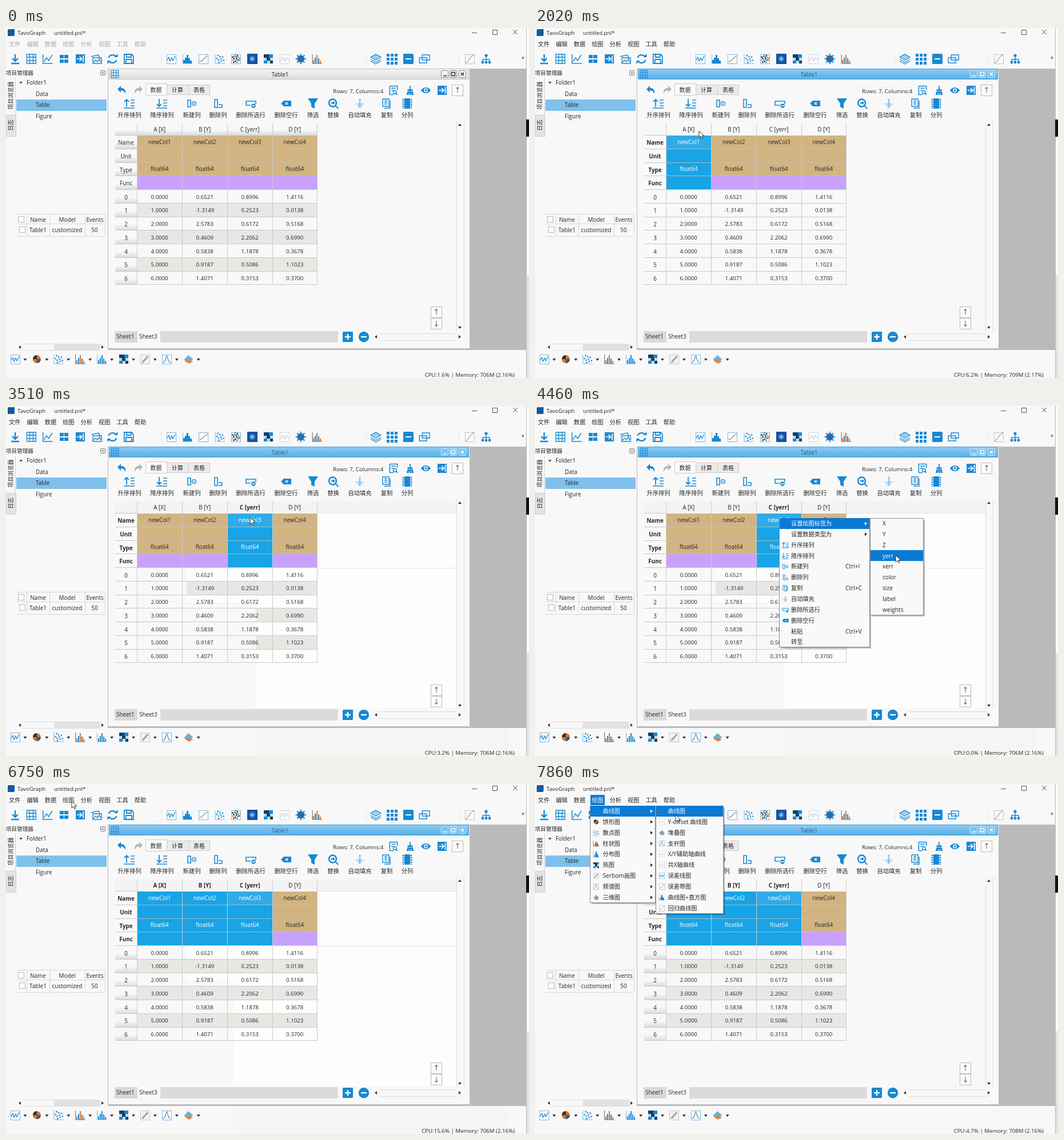
These frames come from a looping animation (915x612 px, 8000 ms). An HTML page:

```html
<!DOCTYPE html>
<html lang="zh">
<head>
<meta charset="utf-8">
<title>Table editor</title>
<style>
  html, body { margin: 0; width: 100%; height: 100%; overflow: hidden; background: #f8f8f8; }
  svg { display: block; }
  text { font-family: "Open Sans", "Noto Sans CJK SC", "Noto Sans CJK", sans-serif; white-space: pre; }
  rect { shape-rendering: crispEdges; }
</style>
</head>
<body>
<svg width="915" height="612" viewBox="0 0 915 612">
  <defs>
    <linearGradient id="head" x2="0" y2="1"><stop offset=".55" stop-color="#f8f8f8"/><stop offset="1" stop-color="#dadada"/></linearGradient>
    <linearGradient id="idle" x2="0" y2="1"><stop stop-color="#f4f4f4"/><stop offset="1" stop-color="#dedede"/></linearGradient>
    <linearGradient id="live" x2="0" y2="1"><stop stop-color="#8ccbf3"/><stop offset="1" stop-color="#59b0e6"/></linearGradient>
  </defs>
  <g id="base"></g>
  <g id="scene"></g>
</svg>
<script>
const BLUE = '#1788d4', INK = '#262626', HOT = '#0a7ad4', PICK = '#18a4e6', CURRENT = '#2fabe8';
const LOOP = 8000;

const rect = (x, y, w, h, fill = 'none', stroke = 'none', r = 0) =>
  `<rect x="${x}" y="${y}" width="${w}" height="${h}" fill="${fill}" stroke="${stroke}" rx="${r}"/>`;
const path = (d, stroke = BLUE, width = 1, fill = 'none', dash = 'none') =>
  `<path d="${d}" stroke="${stroke}" stroke-width="${width}" fill="${fill}" stroke-dasharray="${dash}"/>`;
const shape = (d, fill = BLUE) => path(d, 'none', 0, fill);
const dashed = (d, stroke, dash, width = 1) => path(d, stroke, width, 'none', dash);
const dot = (x, y, r, fill = BLUE) => `<circle cx="${x}" cy="${y}" r="${r}" fill="${fill}"/>`;
const ring = (x, y, r, width) => `<circle cx="${x}" cy="${y}" r="${r}" fill="none" stroke="${BLUE}" stroke-width="${width}"/>`;
const text = (x, y, str, { size = 9.9, fill = INK, anchor = 'start', bold = false } = {}) =>
  `<text x="${x}" y="${y + 3.6}" font-size="${size}" fill="${fill}" text-anchor="${anchor}" font-weight="${bold ? 700 : 400}">${str}</text>`;
const mid = (x, y, str, opts) => text(x, y, str, { anchor: 'middle', ...opts });
const times = (n, fn) => Array.from({ length: n }, (_, i) => fn(i)).join('');

// Icons live in a box from -9 to 9.
const frame = rect(-8, -8, 16, 16, '#fdfdfd', '#7bb8e3');
const bars = colors => [6, 10, 15, 9, 5].map((h, i) => rect(-7 + i * 3, 8 - h, 2.2, h, colors[i % colors.length])).join('');
const cloud = (n, colors) => times(n, i => {
  const r = 7.5 * Math.sqrt((i + .5) / n);
  return dot(r * Math.cos(i * 2.4), r * Math.sin(i * 2.4), 1.3, colors[i % colors.length]);
});
const arrows = tip => path('M2-6H9M2-1H9M2 4H9M-10 8H9', BLUE, 1.7) + path(tip, BLUE, 1.8);
const column = path('M-7-6H-2V6H-7Z', BLUE, 1.6);
const icons = {
  down: path('M0-8V4M-5-1L0 4 5-1M-7 8H7', BLUE, 2.4),
  grid: path('M-8-8H8V8H-8ZM-8-3H8M-8 3H8M-3-8V8M3-8V8', BLUE, 1.3),
  plot: path('M-8-8V8H9M-6 5L-2-2 2 3 8-7', BLUE, 1.5),
  tiles: times(4, i => rect(-7 + i % 2 * 8, -7 + (i >> 1) * 8, 6.3, 6.3, BLUE)),
  into: rect(-8, -8, 16, 16, BLUE) + path('M-6 0H3M-1-4L3 0-1 4M5.5-6V6', '#fff', 1.7),
  album: path('M-9-4L4-7 6 0M-6-2H9V8H-6ZM-5 6L-1 2 2 5 5 1 8 5', BLUE, 1.4),
  sync: path('M-7-2A7.5 7.5 0 0 1 6-4M7 2A7.5 7.5 0 0 1-6 4', BLUE, 2.2) + shape('M3-3H9V-9ZM-3 3H-9V9Z'),
  save: path('M-8-8H5L8-5V8H-8ZM-4-8V-3H4V-8M-5 8V1H5V8', BLUE, 1.8),
  wave: frame + path('M-7 2L-4-3-2 4 1-2 3 3 7-5', BLUE, 1.3),
  bars: path('M-8-8V8H9', '#7bb8e3') + bars([BLUE]),
  trend: frame + path('M-7 5C0 4 0-3 7-5', '#8a8f70', 1.2),
  scatter: path('M-8-8V8H9', '#7bb8e3') + cloud(9, [BLUE]),
  mixed: frame + cloud(16, ['#222', '#d87b2a', '#222', BLUE]),
  heat: rect(-9, -9, 18, 18, '#1b4f9c') + dot(0, 0, 5, '#2e8bd8') + dot(0, 0, 2.2, '#8fd3ee'),
  blocks: rect(-8, -8, 16, 16, '#b9dcec') + rect(-8, -8, 9, 6, '#123e66') + rect(1, -8, 7, 6, BLUE)
    + rect(-3, -2, 6, 5, '#123e66') + rect(-8, 3, 6, 5, BLUE) + rect(3, 3, 5, 5, '#123e66'),
  pale: rect(-8, -8, 16, 16, '#fdfdfd', '#c9d8e4') + path('M-7 3L-3-3 0 4 3-3 7 3', '#b5b9d8'),
  blob: dot(0, 0, 6.5, '#2c6da8') + times(8, i => dot(8 * Math.cos(i * .785), 8 * Math.sin(i * .785), 1.3)),
  hist: path('M-8-8V8H9', '#666') + bars(['#d8752d', BLUE]),
  layers: shape('M0-9L9-4 0 1-9-4Z', '#9fd0f0') + path('M0-8L9-3 0 2-9-3ZM-9 1L0 6 9 1M-9 4L0 9 9 4', BLUE, 1.2),
  nine: times(9, i => rect(-9 + i % 3 * 7, -9 + (i / 3 | 0) * 7, 4.6, 4.6, BLUE)),
  minus: rect(-9, -9, 18, 18, BLUE, 'none', 2) + rect(-5, -1.2, 10, 2.4, '#fff'),
  windows: path('M-4-7H9V2H-4ZM-9-2H4V7H-9Z', BLUE, 1.4),
  curve: rect(-8, -8, 16, 16, 'none', '#c4c4c4') + path('M-7 7C-1 5-2-1 8-8', '#777'),
  tree: path('M0-5V1M-6 5V1H6V5M0 1V5', BLUE, 1.3) + dot(0, -6, 2.6) + dot(-6, 6, 2.4) + dot(0, 6, 2.4) + dot(6, 6, 2.4),
  pie: dot(0, 0, 7, '#d97428') + shape('M0 0V-7A7 7 0 0 0-7 0Z', '#333') + shape('M0 0H7A7 7 0 0 1 0 7Z', '#235d91'),
  brushed: rect(-8, -8, 16, 16, '#f2f2f2', '#c9c9c9') + path('M-5 6L5-5', '#b79b85', 3),
  peak: frame + path('M-7 6C-1 6-2-6 0-6S1 6 7 6', '#477ca8', 1.2),
  solid: shape('M-8 1L0-7 8 0 1 6Z', '#62b4dc') + shape('M-7 3L1 1 8 4 1 8Z', '#d98848'),
  undo: shape('M-8-1L-2-7V-3C5-3 7 2 6 7 4 3 2 1-2 1V5Z'),
  redo: shape('M8-1L2-7V-3C-5-3-7 2-6 7-4 3-2 1 2 1V5Z', '#b5b5b5'),
  find: path('M-7-8H7V-1M-7-8V8H0M-4-4H4M-4 0H0', BLUE, 1.6) + path('M7 8L4 5', BLUE, 2) + ring(2.5, 3.5, 3, 1.5),
  broom: shape('M-1-9H1V-2H5V1H-5V-2H-1ZM-5 2H5L7 9H-7Z') + path('M-2 5V9M2 5V9', '#fff'),
  eye: shape('M-9 0C-4-7 4-7 9 0 4 7-4 7-9 0Z') + dot(0, 0, 3.6, '#fff') + dot(0, 0, 2),
  asc: arrows('M-5 6V-7M-9-3L-5-7-1-3'),
  desc: arrows('M-5-8V5M-9 1L-5 5-1 1'),
  addcol: column + ring(4, 0, 3.4, 1.4) + path('M5 0H3M4-1V1', BLUE, 1.2),
  delcol: path('M-6-7H-1V7H-6Z', BLUE, 1.6) + path('M1 7H7V2H1', BLUE, 1.5),
  delrow: path('M0 3H-8V-4H9V1', BLUE, 1.6) + dot(5, 4, 3.7) + rect(3, 3.4, 4, 1.2, '#fff'),
  empty: shape('M-9 0L-4-5H9V5H-4Z') + path('M-1-2L3 2M3-2L-1 2', '#fff', 1.4),
  filter: shape('M-9-9H9L3 0V9L-3 6V0Z'),
  swap: ring(-1, -1, 6.5, 2.4) + path('M4 4L9 9M-4-1H2M0-3L2-1 0 1', BLUE, 2),
  fill: dashed('M0-8V6', '#6cb5e4', '2 1', 3) + dashed('M-7 1H7M-4 4H4M-2 7H2', '#6cb5e4', '2 1', 1.6),
  copy: path('M-7-8H4V5H-7ZM6-5V8H-4M-4-5H1M-4-2H1M-4 1H1', BLUE, 1.4),
  split: rect(-5, -9, 10, 18, BLUE) + dashed('M-7-8V9M7-8V9', BLUE, '2.4 1.6', 2.6)
};
const icon = (name, x, y, scale = 1) => `<g transform="translate(${x} ${y}) scale(${scale})">${icons[name]}</g>`;
const iconRow = (names, x, y, gap) => names.split(' ').map((n, i) => icon(n, x + i * gap, y)).join('');
const tri = (x, y, dir, fill = '#333') =>
  shape({ l: `M${x + 2} ${y - 3}v6l-4-3z`, r: `M${x - 2} ${y - 3}v6l4-3z`, u: `M${x - 3} ${y + 2}h6l-3-4z`, d: `M${x - 3} ${y - 2}h6l-3 4z` }[dir], fill);
const arrowBox = (x, y, s) => rect(x + .5, y + .5, 19, 19, '#fbfbfb', '#bbb') + mid(x + 10, y + 10, s, { size: 11 });

function baseLayer() {
  const tools = [['asc', 216, '升序排列'], ['desc', 273, '降序排列'], ['addcol', 325, '新建列'], ['delcol', 371, '删除列'],
    ['delrow', 428, '删除所选行'], ['empty', 490, '删除空行'], ['filter', 537, '筛选'], ['swap', 572.5, '替换'],
    ['fill', 619, '自动填充'], ['copy', 666, '复制'], ['split', 702, '分列']];
  return rect(0, 0, 915, 612, '#f8f8f8')
    + rect(3, 2, 12, 12, '#155a9c', 'none', 2)
    + text(20, 8, 'TavoGraph', { size: 9.8 }) + text(84, 8, 'untitled.pnl*', { size: 9.4 })
    + path('M815 8.500H824M851.500 3.500H859.500V11.500H851.500ZM887 3L895 11M895 3L887 11', '#555')
    + iconRow('down grid plot tiles into album sync save', 16, 54, 28.4)
    + iconRow('wave bars trend scatter mixed heat blocks pale blob hist', 289, 54, 28.35)
    + iconRow('layers nine minus windows', 647, 54, 28.4) + icon('curve', 811, 54) + icon('tree', 840, 54)
    + [272, 630, 793].map(x => dashed(`M${x} 46V64`, '#c8c8c8', '1.5 2')).join('')
    + text(902, 51, '»')
    // project panel
    + text(0, 78, '项目管理器', { size: 9.6 })
    + rect(165.5, 74.5, 8, 8, 'none', '#777', 2) + path('M167.500 76.500L171.500 80.500M171.500 76.500L167.500 80.500', '#555')
    + rect(0, 152, 17, 37, '#e3e3e3', '#cfcfcf') + path('M16.500 87V152', '#d0d0d0')
    + [[118, '项目浏览器'], [170, '日志']].map(([y, s]) => `<g transform="translate(8 ${y}) rotate(-90)">${mid(0, 0, s, { size: 9.8 })}</g>`).join('')
    + tri(26, 96, 'd', '#555') + text(36, 95, 'Folder1') + text(52, 115, 'Data')
    + rect(18, 125, 158, 20, '#7fc0ec') + text(52, 134.5, 'Table') + text(52, 154, 'Figure')
    + path('M19 325.500H173M36.500 326V342M76.500 326V342M138.500 326V342M173.500 326V342', '#d5d5d5')
    + dashed('M19 342.500H173M19 364.500H173M36.500 343V364M76.500 343V364M138.500 343V364M173.500 343V364', '#c9c9c9', '2 1')
    + rect(21.5, 329.5, 10, 10, '#fff', '#b5b5b5') + rect(23.5, 347.5, 10, 10, '#fff', '#b5b5b5')
    + mid(56, 335, 'Name') + mid(107, 335, 'Model') + mid(155.5, 335, 'Events')
    + mid(56, 353, 'Table1') + mid(107, 353, 'customized') + mid(155, 353, '50')
    + rect(84, 552, 81, 11, '#e1e1e1') + path('M29 552.500H165M29 563.500H165', '#ddd') + tri(24, 558, 'l') + tri(169, 558, 'r')
    // document window
    + rect(178, 71, 732, 492, '#bababa') + rect(179, 72, 632, 488, '#f8f8f8')
    + icon('undo', 203, 108) + icon('redo', 231, 108)
    + rect(281.5, 99.5, 38, 17, '#ebebeb', '#ccc') + rect(319.5, 99.5, 37, 17, '#ebebeb', '#ccc')
    + rect(244.5, 97.5, 37, 20, '#fafafa', '#ccc')
    + mid(262.5, 108, '数据') + mid(300, 108, '计算') + mid(338, 108, '表格')
    + text(572, 110, 'Rows: 7, Columns:4', { size: 9.8 })
    + icon('find', 678, 109, .95) + icon('broom', 707, 109, .9) + icon('eye', 734.5, 109, .95) + icon('into', 763, 109) + arrowBox(780, 99, '↑')
    + tools.map(([n, x, s]) => icon(n, x, 132) + mid(x, 152, s, { size: 10.3 })).join('')
    + path('M788.500 163V530M801.500 163V530', '#dadada') + tri(794, 169, 'u') + tri(794, 524, 'd')
    + rect(190, 530, 40, 20, '#d9d9d9') + text(193, 539.5, 'Sheet1') + text(233, 539.5, 'Sheet3') + rect(270, 530, 311, 20, '#dbdbdb')
    + rect(589, 531, 18, 18, BLUE, 'none', 2) + path('M593 540H603M598 535V545', '#fff', 2.4)
    + dot(626, 540, 9.2) + path('M621 540H631', '#fff', 2.4)
    + path('M652 534.500H789M652 546.500H789', '#dadada') + tri(647, 540, 'l') + tri(794, 540, 'r')
    + iconRow('wave pie scatter hist bars blocks brushed peak solid', 16, 579, 37.9) + times(9, i => tri(33.5 + i * 37.9, 580, 'd'))
    // desktop edge
    + rect(910, 0, 5, 612, '#fcfcfc') + path('M910.500 0V612', '#bbb') + rect(910, 160, 5, 30, '#111') + rect(911, 432, 4, 180, '#e0e2e8');
}

const edges = [229.5, 308.5, 387.5, 466.5, 544.5];
const values = [[0.6521, -1.3149, 2.5783, 0.4609, 0.5838, 0.9187, 1.4071],
  [0.8996, 0.2523, 0.6172, 2.2062, 1.1878, 0.5086, 0.3153],
  [1.4116, 0.0138, 0.5168, 0.6990, 0.3678, 1.1023, 0.3700]];
const heads = ['A [X]', 'B [Y]', 'C [yerr]', 'D [Y]'];
const rowY = i => 188 + 23.75 * i;

function table(s) {
  const right = 545, full = s.stripes === 'all', pick = s.pick || '';
  let out = '';
  if (s.lit) out += rect(316, 283, 472, 60, '#fdfdfd') + rect(s.lit, 343, 788 - s.lit, 185, '#fdfdfc')
    + rect(545, 188, 243, 95, '#fdfdfd') + rect(190, 167, 598, 20, '#f3f3f3') + path('M545 187.500H788M545 283.500H788', '#e4e4e4')
    + rect(s.lit, 565, 878 - s.lit, 45, '#f5f5f5');
  if (s.stripes !== 'none') [1, 3, 5].forEach(i => {
    const x = full ? 230 : i === 1 ? 316 : 437;
    out += rect(x, rowY(4 + i), right - x, 23.75, '#e8e7e4');
  });
  out += times(11, i => rect(191, rowY(i), 38.5, 23.5, (i < 4 ? pick : !full) ? '#f9f9f9' : 'url(#head)'));
  if (!pick) out += rect(191, 166, 354, 21.5, 'url(#head)');
  heads.forEach((h, c) => {
    const letter = 'ABCD'[c], on = pick.includes(letter), fill = on ? '#fff' : INK;
    const x = edges[c], w = edges[c + 1] - x, cx = x + w / 2 - .3;
    out += rect(x, 188, w, 71, on ? PICK : '#d2b481') + rect(x, 259, w, 24, on ? PICK : '#c8a1fd')
      + (on && pick.endsWith(letter) ? rect(x, 188, w, 23, CURRENT) : '')
      + mid(cx, 177, h, { bold: on && s.bold })
      + mid(cx, 199, 'newCol' + (c + 1), { fill }) + mid(cx, 246, 'float64', { fill })
      + times(7, i => mid(cx, rowY(4 + i) + 12, (c ? values[c - 1][i] : i).toFixed(4), { size: 9.7 }));
  });
  out += times(12, i => path(`M191 ${Math.round(rowY(i)) - .5}H230`, '#c6c6c6'))
    + times(3, i => path(`M230 ${Math.round(rowY(i + 1)) - .5}H545`, '#cac3b6', .8))
    + times(8, i => path(`M230 ${Math.round(rowY(i + 4)) - .5}H545`, '#c9c9c9'))
    + edges.map(x => path(`M${x} 167V449`, '#cbcbcb')).join('');
  ['Name', 'Unit', 'Type', 'Func'].forEach((n, i) => out += mid(210, rowY(i) + 12.5, n, { bold: !!pick }));
  return out + times(7, i => mid(210, rowY(4 + i) + 13, i));
}

const GAP = 18.85;
function menu(x, y, w, left, items, hot) {
  const h = Math.round(items.length * GAP);
  return rect(x + 3, y + 3, w - 1, h - 1, '#0004') + rect(x + .5, y + .5, w - 1, h - 1, '#f9f9f9', '#8d8d8d')
    + items.map(([label, glyph, extra], i) => {
      const cy = y + GAP * (i + .5), fill = i === hot ? '#fff' : INK;
      return (i === hot ? rect(x + 1, Math.floor(y + GAP * i), w - 2, 19, HOT) : '')
        + (glyph ? icon(glyph, x + 11, cy, .62) : '') + text(left, cy, label, { size: 10.2, fill })
        + (extra === '>' ? tri(x + w - 7, cy, 'r', fill) : extra ? text(x + 116, cy, extra, { size: 10.2 }) : '');
    }).join('');
}
const columnMenu = [['设置绘图标签为', '', '>'], ['设置数据类型为', '', '>'], ['升序排列', 'asc'], ['降序排列', 'desc'],
  ['新建列', 'addcol', 'Ctrl+I'], ['删除列', 'delcol'], ['复制', 'copy', 'Ctrl+C'], ['自动填充', 'fill'],
  ['删除所选行', 'delrow'], ['删除空行', 'empty'], ['粘贴', '', 'Ctrl+V'], ['转至']];
const roles = 'X Y Z yerr xerr color size label weights'.split(' ').map(r => [r]);
const plotMenu = [['曲线图', 'plot', '>'], ['饼形图', 'pie', '>'], ['散点图', 'scatter', '>'], ['柱状图', 'hist', '>'], ['分布图', 'bars', '>'],
  ['热图', 'blocks', '>'], ['Serbom画图', 'brushed', '>'], ['频谱图', 'peak', '>'], ['三维图', 'solid', '>']];
const curveMenu = [['曲线图', 'plot'], ['Y-offset 曲线图', 'pale'], ['堆叠图', 'solid'], ['支杆图', 'peak'], ['X/Y辅助轴曲线', 'pale'],
  ['共X轴曲线', 'pale'], ['误差线图', 'wave'], ['误差带图', 'trend'], ['曲线图+直方图', 'bars'], ['回归曲线图', 'trend']];

function scene(s) {
  const names = '文件 编辑 数据 绘图 分析 视图 工具 帮助'.split(' ');
  let out = s.plot ? rect(97, 19, 25, 18, HOT) : '';
  names.forEach((n, i) => out += text(5 + 31.4 * i, 28, n, { size: 10.2, fill: s.plot && i === 3 ? '#fff' : s.active ? INK : '#a9a9a9' }));
  out += rect(180.5, 71.5, 629, 18, s.active ? 'url(#live)' : 'url(#idle)', s.active ? '#4a9fd6' : '#bdbdbd')
    + icon('grid', 190.5, 80.5, .8) + mid(479.5, 81, 'Table1', { fill: s.active ? '#2b5f86' : INK });
  [761, 776, 792].forEach((x, i) => out += rect(x + .5, 74.5, 12, 12, s.active ? '#7cc2ee' : '#f6f6f6', s.active ? '#c5e4f7' : '#888', 2)
    + path([`M${x + 4} 83.500h6`, `M${x + 3.5} 77.500h6v6h-6z`, `M${x + 4} 78l5 5m0-5l-5 5`][i], s.active ? '#fff' : '#222', 1.5));
  out += table(s) + arrowBox(743, 487, '↑') + arrowBox(743, 507, '↓')
    + text(890, 606, `CPU:${s.cpu}% | Memory: ${s.mem}`, { size: 9.7, anchor: 'end' });
  if (s.column) out += menu(427, 196, 159, 448, columnMenu, s.column.hot);
  if (s.roles) out += menu(586, 196, 94, 608, roles, s.roles.hot);
  if (s.plot) out += menu(96, 38, 115, 118.5, plotMenu, 0);
  if (s.curve) out += menu(211, 38, 119, 232.5, curveMenu, 0);
  if (s.at) out += `<g transform="translate(${s.at})">${path('M0 0V12L3 9.2 5 13.5 6.8 12.7 5 8.6H9Z', '#222', .9, '#fff')}</g>`;
  return out;
}

// Each entry changes part of the state at its time in ms.
const steps = [
  [0, { cpu: '1.6', mem: '706M (2.16%)', stripes: 'all' }],
  [550, { at: [903, 570] }],
  [724, { at: [790, 470] }],
  [898, { at: [640, 360] }],
  [1072, { at: [480, 270] }],
  [1246, { at: [360, 215], stripes: 'none' }],
  [1420, { at: [303, 190] }],
  [1600, { at: [287, 180] }],
  [1800, { active: true, pick: 'A' }],
  [2020, { cpu: '6.2', mem: '709M (2.17%)' }],
  [2230, { at: [300, 179], bold: true }],
  [2420, { at: [325, 178] }],
  [2610, { at: [345, 178] }],
  [2790, { pick: 'B', lit: 437, stripes: 'part', cpu: '3.2', mem: '706M (2.16%)' }],
  [2960, { at: [354, 180] }],
  [3140, { at: [362, 182] }],
  [3510, { at: [427, 195], pick: 'C' }],
  [3740, { column: { hot: -1 } }],
  [3920, { at: [480, 204], column: { hot: 0 } }],
  [4100, { at: [568, 206], roles: { hot: -1 } }],
  [4280, { at: [612, 228], roles: { hot: 1 } }],
  [4460, { at: [631, 261], roles: { hot: 3 }, cpu: '0.0' }],
  [5070, { column: null, roles: null }],
  [5260, { at: [500, 224], stripes: 'all' }],
  [5450, { at: [350, 186] }],
  [5640, { at: [270, 171], pick: 'A', bold: false, cpu: '1.6' }],
  [5800, { bold: true }],
  [6220, { at: [345, 178], pick: 'AB', lit: 398 }],
  [6410, { at: [425, 178], pick: 'ABC' }],
  [6590, { at: [280, 105] }],
  [6750, { at: [115, 30], cpu: '15.6' }],
  [6940, { at: [117, 34] }],
  [7180, { at: [119, 37], plot: true }],
  [7360, { at: [150, 45] }],
  [7530, { at: [212, 48], curve: true }],
  [7700, { at: [235, 51], lit: 0 }],
  [7860, { at: [246, 54], cpu: '4.7', mem: '708M (2.16%)' }]
];
let state = {};
const states = steps.map(([start, change]) => ({ start, ...(state = { ...state, ...change }) }));

document.getElementById('base').innerHTML = baseLayer();
const layer = document.getElementById('scene');
const begin = performance.now();
let shown = -1;
function tick() {
  const t = (performance.now() - begin) % LOOP;
  const now = states.findLastIndex(s => s.start <= t);
  if (now !== shown) layer.innerHTML = scene(states[shown = now]);
  requestAnimationFrame(tick);
}
tick();
</script>
</body>
</html>
```
